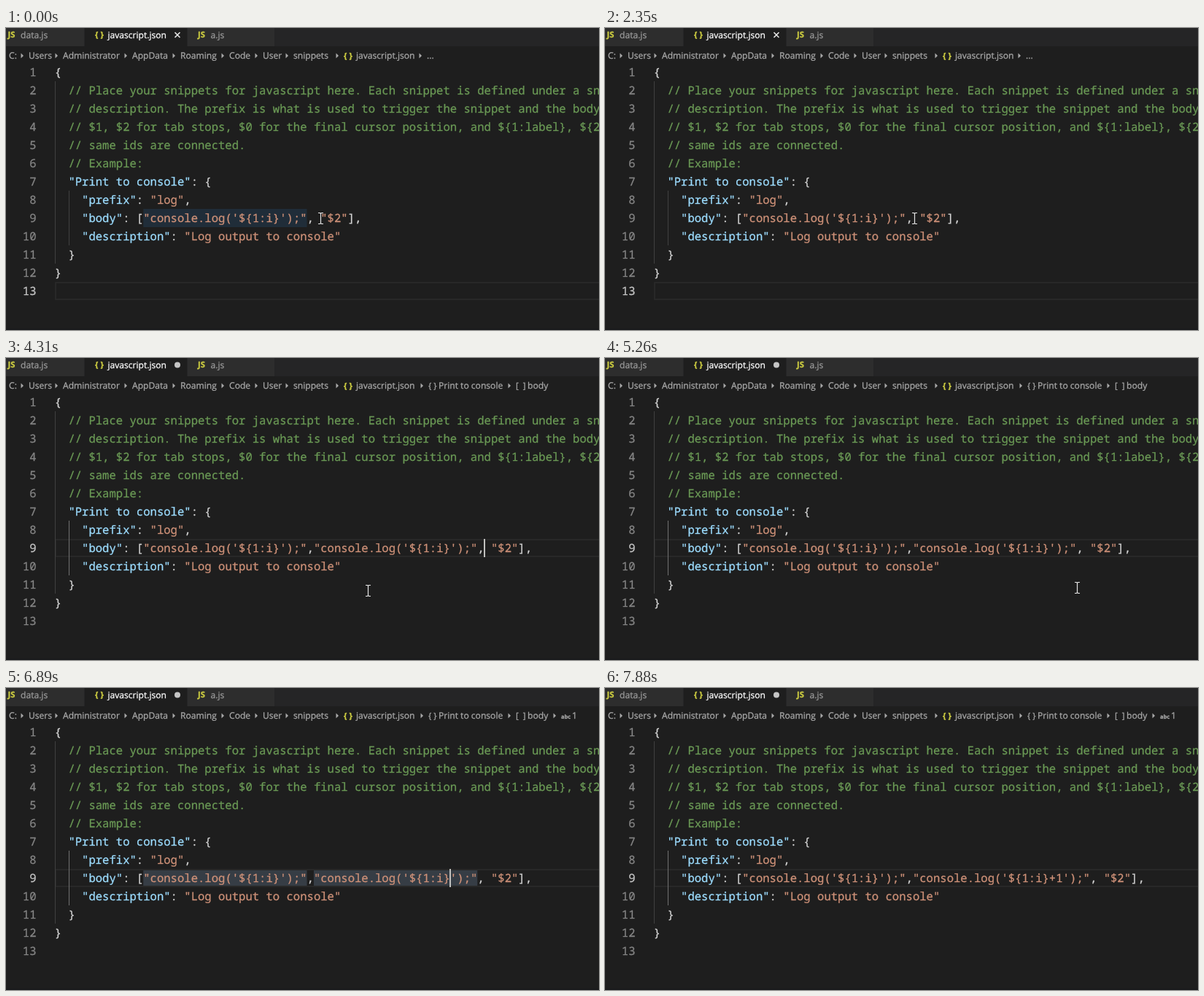
Animation of 813 by 414 pixels, one loop 8 s. Source, as an HTML page:

```html
<!DOCTYPE html>
<html lang="en">
<head>
<meta charset="utf-8">
<title>Snippet editor</title>
<style>
  html, body { margin: 0; width: 100%; height: 100%; overflow: hidden; background: #1e1e1e; }
  svg { display: block; }
  text { white-space: pre; text-rendering: geometricPrecision; }
  text, tspan { fill: currentColor; stroke: currentColor; stroke-width: .28px; }
  .code { font: 15.58px "Noto Sans Mono", monospace; }
  .ui { font: 12.1px "Open Sans", sans-serif; }
  .icon { font: 700 11.3px "Open Sans", sans-serif; }
  .thin { font: 11.5px "Open Sans", sans-serif; }
  .tiny { font: 700 7.5px "Open Sans", sans-serif; }
</style>
</head>
<body>
<svg id="stage" width="813" height="414" viewBox="0 0 813 414"></svg>
<script>
const LOOP = 8000, X0 = 66.7, CHAR = 9.348, ROW = 25;
const GREY = '#a9a9a9', YELLOW = '#cbcb41';
const stage = document.getElementById('stage');

const el = (tag, attrs, parent = stage) => {
  const node = document.createElementNS('http://www.w3.org/2000/svg', tag);
  for (const k in attrs) node.setAttribute(k, attrs[k]);
  return parent.appendChild(node);
};
const rect = (x, y, width, height, fill) => el('rect', { x, y, width, height, fill });
const label = (x, y, str, color, cls, parent) => {
  const node = el('text', { x, y, color, class: cls }, parent);
  node.textContent = str;
  return node;
};
const show = (node, on) => { node.style.display = on ? '' : 'none'; };
const rowTop = n => 48 + ROW * (n - 1);
const colX = c => X0 + CHAR * c;

// Tabs
rect(0, 0, 813, 25, '#252526');
const tab = (x, width, icon, name, active) => {
  rect(x, 0, width, 25, active ? '#1e1e1e' : '#2d2d2d');
  label(x + 14, 13, icon, YELLOW, 'icon');
  label(x + 31.5, 13.5, name, active ? '#ffffff' : '#9a9a9a', 'ui');
};
tab(-11.5, 118.5, 'JS', 'data.js');
tab(108, 140, '{ }', 'javascript.json', true);
tab(249, 119, 'JS', 'a.js');
const closeMark = el('path', { d: 'M231.5 6l7 7m0-7l-7 7', stroke: '#e8e8e8', 'stroke-width': 1.6 });
const dirtyDot = el('circle', { cx: 235, cy: 9.5, r: 4, fill: '#c5c5c5' });

// Breadcrumbs: every entry but the first has an arrow before it
const crumb = (x, str, parent, cls = 'ui', color = GREY) => {
  label(x, 42, str, color, cls, parent);
  if (x > 4) el('path', { d: `M${x - 10.5} 34.5l3.5 3.5-3.5 3.5z`, fill: GREY }, parent);
};
const folders = { 'C:': 4, Users: 31, Administrator: 78, AppData: 173, Roaming: 239, Code: 306, User: 352, snippets: 394 };
for (const name in folders) crumb(folders[name], name);
crumb(463, '{ }', stage, 'icon', YELLOW);
label(480, 42, 'javascript.json', GREY, 'ui');
const [dots, path, leaf] = [0, 1, 2].map(() => el('g', {}));
crumb(577, '...', dots);
crumb(579, '{ }', path, 'thin');
label(593, 42, 'Print to console', GREY, 'ui', path);
crumb(699, '[  ]', path, 'thin');
label(715, 42, 'body', GREY, 'ui', path);
crumb(761, 'abc', leaf, 'tiny');
label(776, 42, '1', GREY, 'ui', leaf);

// Editor backdrop
const words = [13, 38].map(c => rect(colX(c), rowTop(9), 24 * CHAR, ROW, ''));
const current = el('rect', { x: 68, width: 760, height: 23, fill: 'none', stroke: '#282828', 'stroke-width': 2 });
rect(67, rowTop(2), 1, 10 * ROW, '#404040');
const guide = rect(86, rowTop(8), 1, 3 * ROW, '');
rect(0, 412, 813, 2, '#191a1c');

// Code
const write = (node, str) => {
  node.textContent = '';
  for (const part of str.match(/\/\/.*|"[^"]*"|[^"\/]+/g) || []) {
    const color = part[0] === '/' ? '#6a9955'
      : part[0] !== '"' ? '#d4d4d4'
      : str.includes(part + ':') ? '#9cdcfe' : '#ce9178';
    el('tspan', { color }, node).textContent = part;
  }
};
const call = tail => `"console.log('\${1:i}${tail}');",`;
const body = extra => `"body": [${call('')}${extra} "$2"],`;
const lines = [
  '{',
  '  // Place your snippets for javascript here. Each snippet is defined under a snippet',
  '  // description. The prefix is what is used to trigger the snippet and the body of',
  '  // $1, $2 for tab stops, $0 for the final cursor position, and ${1:label}, ${2:label}',
  '  // same ids are connected.',
  '  // Example:',
  '  "Print to console": {',
  '    "prefix": "log",',
  '    ' + body(''),
  '    "description": "Log output to console"',
  '  }',
  '}',
  ''
];
const numbers = [], rows = [];
lines.forEach((line, i) => {
  const y = rowTop(i + 1) + 18;
  numbers[i] = label(41.5, y, i + 1, '', 'code');
  numbers[i].setAttribute('text-anchor', 'end');
  rows[i] = label(colX(line.search(/\S|$/)), y, '', '', 'code');
  write(rows[i], line.trim());
});

const caret = rect(0, rowTop(9), 2, ROW, '#c0c0be');
const mouse = el('path', {
  d: 'M-3.5-7.5h2.5l1 1 1-1h2.5M0-6.5v13M-3.5 7.5h2.5l1-1 1 1h2.5',
  fill: 'none', stroke: '#e4e4e4', 'stroke-width': 1.2
});

// Moments of the story, in ms
const DESELECT = 1210, CLICK = 2470, OPEN_PATH = 2620, PASTE = 3450, RECLICK = 5950,
      OPEN_LEAF = 6070, MATCH = 6190, LEAVE = 6460, KEYS = [7170, 7480];
const inputs = [CLICK, PASTE, RECLICK, ...KEYS];
const TICK = 125, BLINK = 500, LAG = 140;

// Pointer glides: start, ticks taken, end point
const glides = [
  [280, 3, 358, 271], [670, 4, 421, 269], [1210, 5, 424, 261], [2620, 3, 496, 319],
  [5110, 2, 647, 315], [5410, 4, 613, 261], [6340, 1, 747, 327]
];
function pointer(t) {
  let x = 431, y = 261;
  for (const [start, ticks, toX, toY] of glides) {
    if (t < start) break;
    const p = Math.min(1, (Math.floor((t - start) / TICK) + 1) / ticks);
    const ease = 1 - (1 - p) ** 3;
    x += (toX - x) * ease;
    y += (toY - y) * ease;
  }
  return [Math.round(x), Math.round(y)];
}

let shown = body('');

function draw(t) {
  const [mx, my] = pointer(t);
  mouse.setAttribute('transform', `translate(${mx + .5} ${my})`);
  show(mouse, t < LEAVE);

  // The caret restarts its blink after every input
  const typed = KEYS.filter(k => k <= t).length;
  const col = t < PASTE ? 38 : t < RECLICK ? 63 : 58 + typed;
  const last = inputs.findLast(k => k <= t);
  show(caret, t >= CLICK && Math.floor((t - last + LAG) / BLINK) % 2 === 0);
  caret.setAttribute('x', Math.floor(colX(col)));

  const str = body(t < PASTE ? '' : call('+1'.slice(0, typed)));
  if (str !== shown) write(rows[8], shown = str);

  const active = t < CLICK ? 13 : 9;
  current.setAttribute('y', rowTop(active) + 1);
  guide.setAttribute('fill', active === 9 ? '#707070' : '#404040');
  numbers.forEach((n, i) => n.setAttribute('color', i + 1 === active ? '#c6c6c6' : '#858585'));

  const both = t >= MATCH && t < KEYS[0];
  show(words[0], t < DESELECT || both);
  show(words[1], both);
  words.forEach(w => w.setAttribute('fill', both ? '#363d45' : '#202d39'));

  show(closeMark, t < PASTE);
  show(dirtyDot, t >= PASTE);
  show(dots, t < OPEN_PATH);
  show(path, t >= OPEN_PATH);
  show(leaf, t >= OPEN_LEAF);
}

const start = performance.now();
function tick() {
  draw((performance.now() - start) % LOOP);
  requestAnimationFrame(tick);
}
tick();
</script>
</body>
</html>
```
